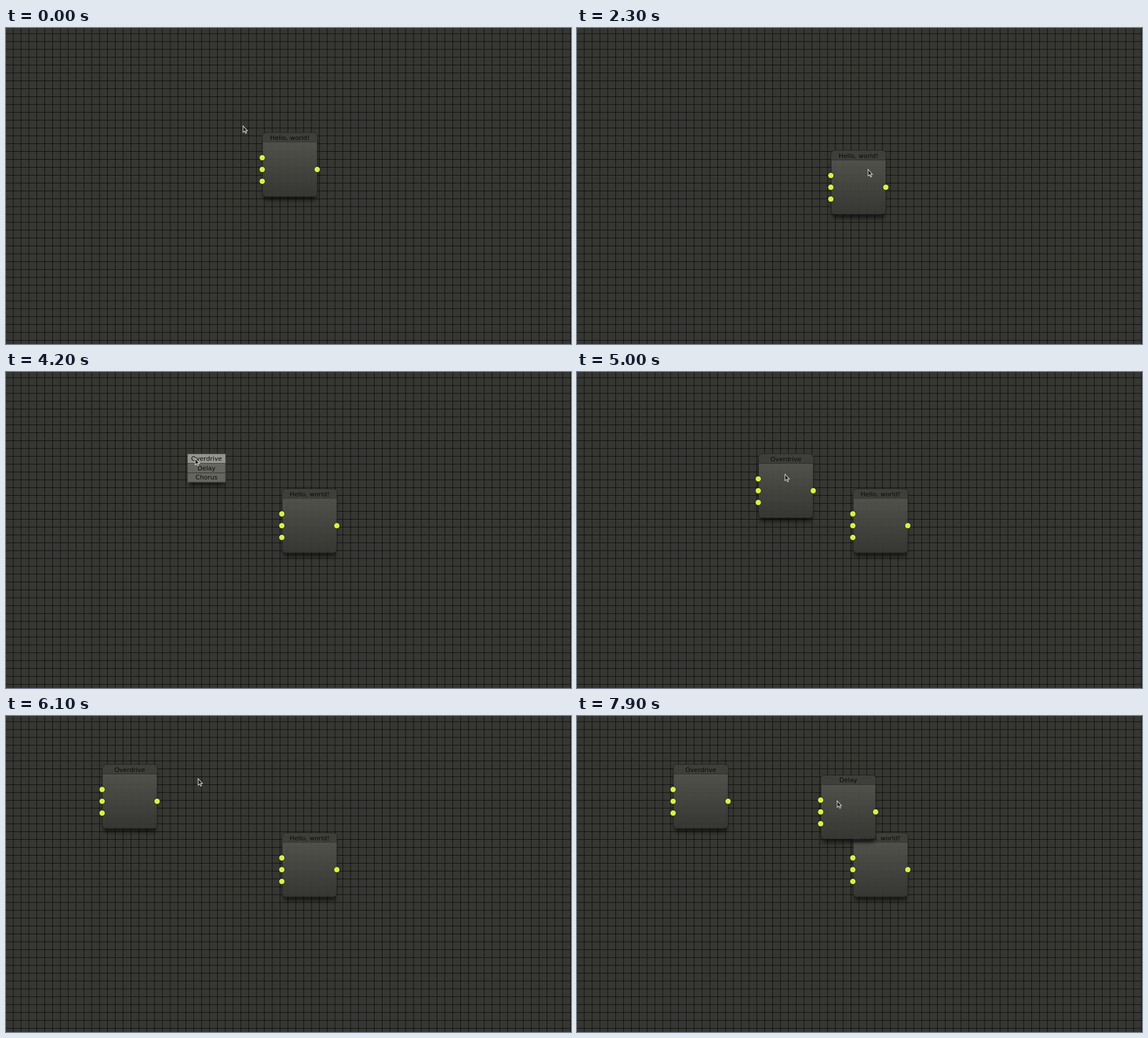
An HTML page with a canvas for the animation above (8 s loop, 1001 by 559 pixels).

```html
<!DOCTYPE html>
<html lang="en">
<head>
<meta charset="utf-8">
<title>Node editor</title>
<style>
html, body { margin: 0; width: 100%; height: 100%; overflow: hidden; background: #363732; }
canvas, svg, div { position: absolute; box-sizing: border-box; left: 0; top: 0; }
.stage { transform-origin: 0 0; font: 16px "DejaVu Sans", sans-serif; color: #0a0a09; text-align: center; }
.node, .menu { border: 1px solid #121210; box-shadow: 0 12px 10px -4px rgba(0, 0, 0, .6); }
.node {
  width: 141px; height: 164px; border-radius: 10px;
  background: linear-gradient(rgba(83, 84, 78, .9) 24px, rgba(54, 55, 50, .9)) padding-box;
}
.title { position: static; height: 24px; line-height: 25px; border-bottom: 1px solid #121210; border-radius: 9px 9px 0 0; background: #3e3f3a; }
.port { width: 16px; height: 16px; margin: -9px; border: 1px solid #000; border-radius: 50%; background: #d9f04b; }
.menu { width: 98px; height: 73px; border-color: #30312d; background: rgba(104, 105, 99, .95); }
.row { position: static; height: 24px; line-height: 24px; border-bottom: 1px solid #1d1e1b; }
.row:last-child { border: 0; }
.on { background: #94958e; }
svg { overflow: visible; width: 12px; height: 20px; }
</style>
</head>
<body>
<canvas width="1001" height="559"></canvas>
<script>
const LOOP = 8000, STEP = 100, SCALE = 0.6952, ROW = 24;
const HELLO = 'Hello, world!';

// Cursor moves in stage units; a dragged node trails by `lag` steps.
const moves = [
  { at: 1200, steps: 2, to: [731, 319] },
  { at: 1700, steps: 3, to: [722, 365], drag: HELLO, lag: 0.66 },
  { at: 2300, steps: 3, to: [781, 350], drag: HELLO, lag: 0.85, ease: 1 },
  { at: 3000, steps: 3, to: [462, 206] },
  { at: 4100, steps: 2, to: [482, 220] },
  { at: 4900, steps: 2, to: [530, 260] },
  { at: 5400, steps: 4, to: [313, 175], drag: 'Overdrive', lag: 0.25 },
  { at: 6100, steps: 3, to: [621, 148] },
  { at: 7000, steps: 2, to: [642, 182] },
  { at: 7900, steps: 1, to: [663, 216] }
];
const home = [604, 249];
moves.forEach((m, i) => {
  const from = i ? moves[i - 1].to : home;
  m.by = m.to.map((v, j) => v - from[j]);
});

function progress({ at, steps, ease = 2.1 }, t, lag) {
  const done = Math.floor((t - at) / STEP) + 1;
  if (done <= 0) return 0;
  if (done >= steps) return 1;
  return 1 - (1 - (done - lag) / steps) ** ease;
}

function travel(start, list, t, trailing) {
  return list.reduce((pos, m) => {
    const p = progress(m, t, trailing ? m.lag : 0);
    return pos.map((v, j) => v + m.by[j] * p);
  }, start);
}

const cursorAt = t => travel(home, moves, t, false);

function menuSpot(t) {
  const [x, y] = cursorAt(t);
  return [x, y + 2];
}

function add(parent, cls, text = '') {
  const el = document.createElement('div');
  el.className = cls;
  el.textContent = text;
  return parent.appendChild(el);
}

function place(el, [x, y]) {
  el.style.transform = `translate(${x}px, ${y}px)`;
}

function show(el, on) {
  el.style.display = on ? 'block' : 'none';
}

function drawGrid() {
  const g = document.querySelector('canvas').getContext('2d');
  g.scale(SCALE, SCALE);
  for (let x = 18; x < 1440; x += 20) g.fillRect(x, 0, 1, 810);
  for (let y = 14; y < 810; y += 20) g.fillRect(0, y, 1440, 1);
}

function makeNode(name, born, start) {
  const el = add(stage, 'node');
  add(el, 'title', name);
  for (const [x, y] of [[0, 64], [0, 94], [0, 124], [140, 94]]) place(add(el, 'port'), [x, y]);
  return { el, born, start, drags: moves.filter(m => m.drag === name) };
}

drawGrid();
const stage = add(document.body, 'stage');
stage.style.transform = `scale(${SCALE})`;

const popups = [
  { open: 3600, close: 4500, pick: 'Overdrive' },
  { open: 6700, close: 7500, pick: 'Delay' }
];
const nodes = [
  makeNode(HELLO, 0, [653, 266]),
  ...popups.map(p => makeNode(p.pick, p.close, menuSpot(p.open)))
];
const menu = add(stage, 'menu');
const rows = ['Overdrive', 'Delay', 'Chorus'].map(name => add(menu, 'row', name));
stage.insertAdjacentHTML('beforeend',
  '<svg><path transform="scale(1.44)" d="M0 0V11.5L2.7 9.2 4.6 13.2 6.3 12.4 4.5 8.6H7.8Z" fill="#1c1c1a" stroke="#e4e4e2"/></svg>');
const cursor = stage.querySelector('svg');

function frame() {
  const t = performance.now() % LOOP;
  const tip = cursorAt(t);
  place(cursor, tip);
  for (const n of nodes) {
    show(n.el, t >= n.born);
    place(n.el, travel(n.start, n.drags, t, true));
  }
  const popup = popups.find(p => t >= p.open && t < p.close);
  show(menu, popup);
  if (popup) {
    const spot = menuSpot(popup.open);
    const active = Math.floor((tip[1] - spot[1]) / ROW);
    place(menu, spot);
    rows.forEach((row, i) => row.classList.toggle('on', i === active));
  }
  requestAnimationFrame(frame);
}
frame();
</script>
</body>
</html>
```
